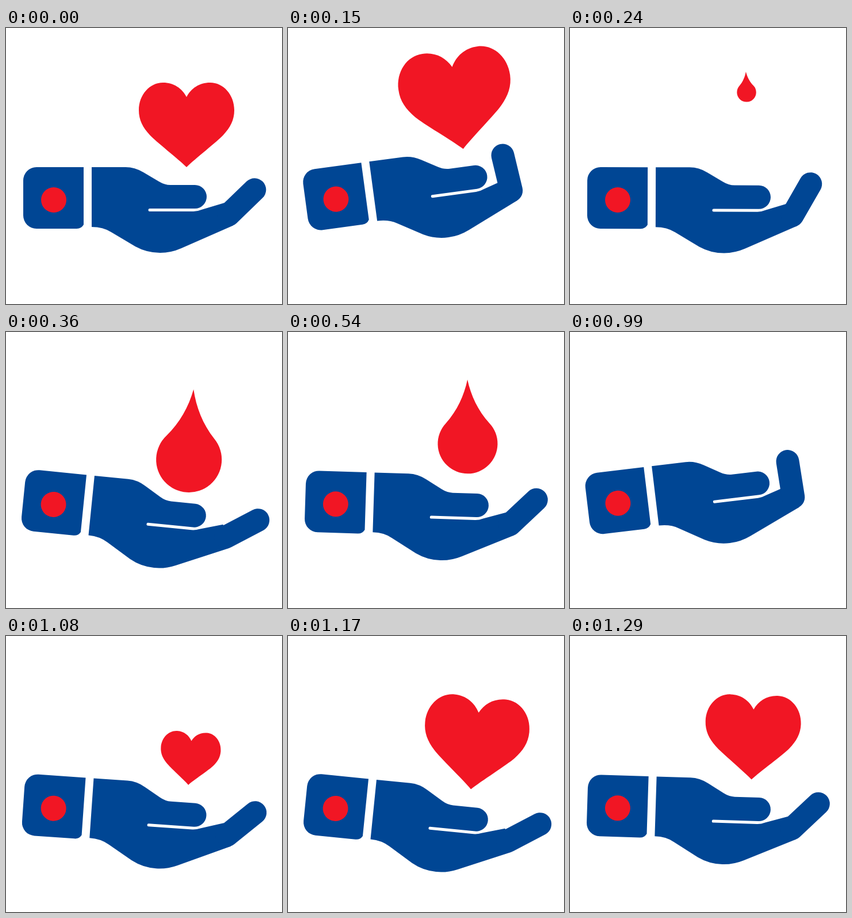
These frames come from a looping animation (480x480 px, 1.92 s). An HTML page:

```html
<!DOCTYPE html>
<html lang="en">
<head>
<meta charset="utf-8">
<title>Giving hand</title>
<style>
  html, body { margin: 0; height: 100%; overflow: hidden; background: #fff; }
  svg { display: block; width: 100vw; height: 100vh; }
  .blue { fill: #004694; }
  .red { fill: #f11624; }
  #finger { stroke: #004694; stroke-width: 40; stroke-linecap: round; }
</style>
</head>
<body>
<svg viewBox="0 0 480 480">
  <g id="hand">
    <path class="blue" d="M53 242H135V342Q131 349 123 349H53A23 23 0 0 1 30 326V265A23 23 0 0 1 53 242Z"/>
    <circle class="red" cx="83" cy="299" r="22"/>
    <path class="blue" d="M149 242H208Q224 242 239 251L266 267Q276 273 286 273H328.5A20.5 20.5 0 0 1 328.5 314H250A2.5 2.5 0 0 0 250 319H326Q333 319 340 316L380 304L395 343.500L305 383Q287 391 268 391Q245 391 225 380L183 355Q169 346 149 346Z"/>
    <line id="finger" x1="387" y1="325" x2="450" y2="325"/>
    <path id="heart" class="red" d="M0 0C-14 -14 -54 -45 -64 -56C-76 -69 -83 -82 -83 -99C-83 -126 -64 -147 -41 -147C-22 -147 -8 -137 0 -122C8 -137 22 -147 41 -147C64 -147 83 -126 83 -99C83 -82 76 -69 64 -56C54 -45 14 -14 0 0Z"/>
    <path id="drop" class="red" d="M0 0C-6 28 -18 54 -38 76A52 52 0 1 0 38 76C18 54 6 28 0 0Z"/>
  </g>
</svg>
<script>
const LOOP = 1920, STEP = 30, SECOND_TOSS = 810;
const UP = 155, DOWN = 315, SETTLED = 480; // times within one toss

// Angles of the whole hand and of the finger against it.
const start = { tilt: 0, bend: -44 };
const raised = { tilt: -7.7, bend: -96 };
const lowered = { tilt: 6.6, bend: -31 };
const rest = { tilt: 1.8, bend: -45 };

function ease(t, from, to, a, b) {
  const u = Math.min(1, Math.max(0, (t - from) / (to - from)));
  return a + (b - a) * (1 - Math.cos(Math.PI * u)) / 2;
}

function handAngle(name, t, first) {
  if (t < UP) return ease(t, 0, UP, first[name], raised[name]);
  if (t < DOWN) return ease(t, UP, DOWN, raised[name], lowered[name]);
  return ease(t, DOWN, SETTLED, lowered[name], rest[name]);
}

// The tossed shape swells, then vanishes; the caught one pops in and settles.
const tossedSize = (t, gone) => ease(t, 0, UP, 1, 1.18) * ease(t, gone - 90, gone, 1, 0);
const caughtSize = t => t < 345 ? ease(t, 180, 345, 0, 1.1) : ease(t, 345, SETTLED, 1.1, 1);

function transform(id, value) {
  document.getElementById(id).setAttribute('transform', value);
}

function draw(now) {
  const time = Math.floor(now % LOOP / STEP) * STEP;
  const isSecond = time >= SECOND_TOSS;
  const t = isSecond ? time - SECOND_TOSS : time;
  const first = isSecond ? rest : start;
  const heartSize = isSecond ? caughtSize(t) : tossedSize(t, 240);
  const dropSize = isSecond ? tossedSize(t, 150) : caughtSize(t);

  transform('hand', `rotate(${handAngle('tilt', t, first)} 73 295)`);
  transform('finger', `rotate(${handAngle('bend', t, first)} 387 325)`);
  transform('heart', `translate(314 242) scale(${heartSize})`);
  transform('drop', `translate(305.3 75.4) rotate(-2) scale(${dropSize})`);
}

const begin = performance.now();
function tick() {
  draw(performance.now() - begin);
  requestAnimationFrame(tick);
}
tick();
</script>
</body>
</html>
```
